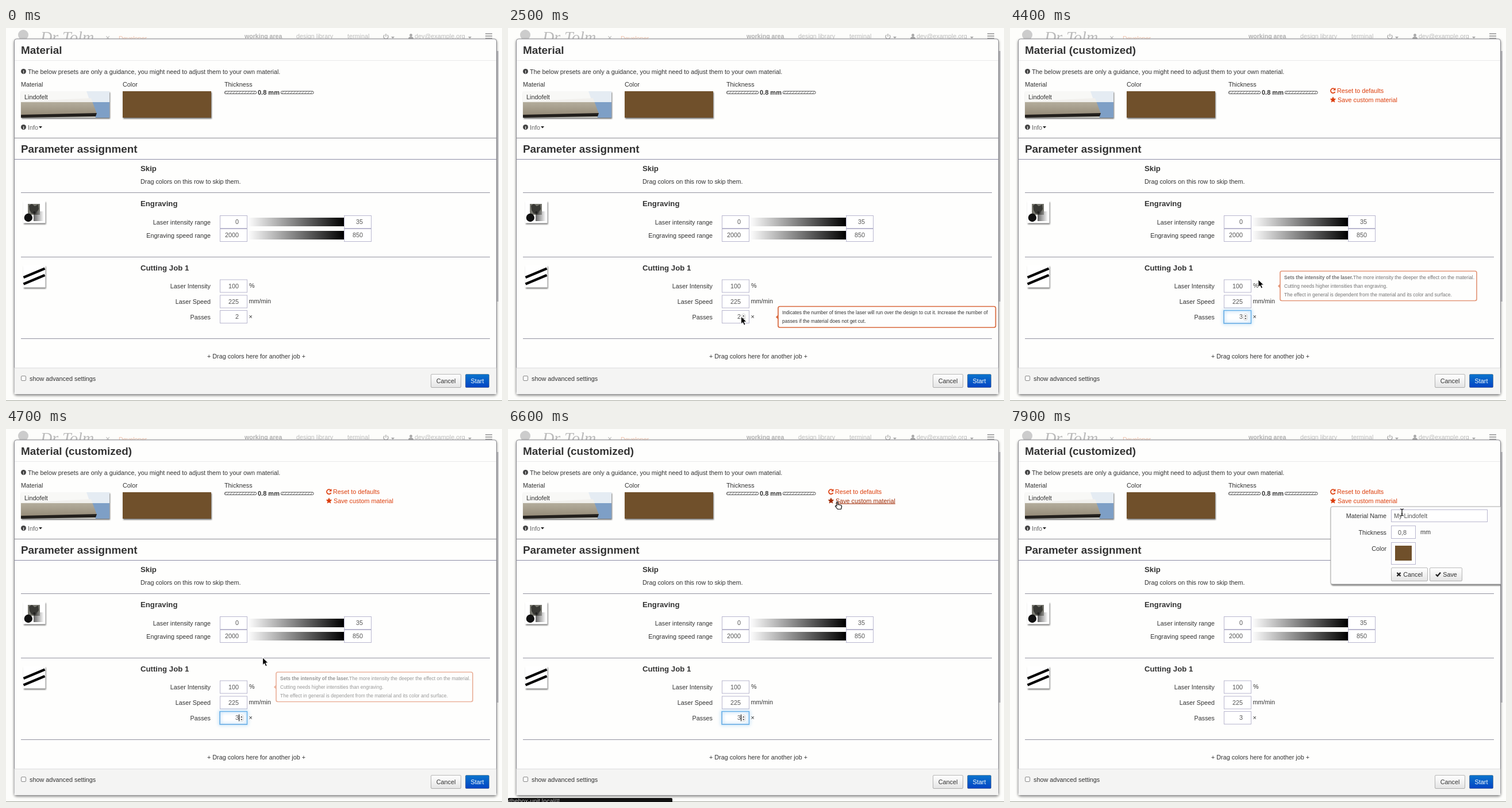
An HTML page that plays this animation: 863x649 px, repeating every 8000 ms.

```html
<!DOCTYPE html>
<html lang="en">
<head>
<meta charset="utf-8">
<title>Material settings</title>
<style>
html, body { margin: 0; width: 100%; height: 100%; overflow: hidden; background: #fdfdfb; }
svg { display: block; font: 10.8px "Liberation Sans", Arial, sans-serif; }
text { white-space: pre; }
.card { filter: drop-shadow(1px 2px 1px #0008); }
.link { fill: #dc3e0c; }
</style>
</head>
<body>
<svg id="stage" width="863" height="649" viewBox="0 0 863 649">
  <defs>
    <linearGradient id="ramp"><stop stop-color="#fff"/><stop offset="1"/></linearGradient>
    <linearGradient id="grey" x2="0" y2="1"><stop stop-color="#fff"/><stop offset="1" stop-color="#e4e4e4"/></linearGradient>
    <linearGradient id="blue" x2="0" y2="1"><stop stop-color="#0a74cc"/><stop offset="1" stop-color="#0444c4"/></linearGradient>
    <linearGradient id="slab" x2="0" y2="1"><stop stop-color="#bdb8a8"/><stop offset="1" stop-color="#958b78"/></linearGradient>
    <pattern id="hatch" width="5" height="6" patternUnits="userSpaceOnUse"><path d="M0 6L5 0" stroke="#777"/></pattern>
    <clipPath id="modalClip"><rect x="14" y="19" width="839.5" height="618"/></clipPath>
  </defs>
</svg>
<script>
const INK = '#333', BROWN = '#70502b', FIELD = '#b9b7cf';
const stage = document.getElementById('stage');

const text = (x, y, s, attrs = '') => `<text x="${x}" y="${y}" fill="${INK}" ${attrs}>${s}</text>`;
const bold = (x, y, s, size, attrs = '') => text(x, y, s, `font-weight="bold" font-size="${size}" ${attrs}`);
const label = (y, s, x = 356) => text(x, y, s, 'text-anchor="end"');
const rect = (x, y, w, h, fill, attrs = '') =>
  `<rect x="${x}" y="${y}" width="${w}" height="${h}" fill="${fill}" ${attrs}/>`;
const path = (d, attrs) => `<path d="${d}" ${attrs}/>`;
const line = (y, x1, x2, color) => path(`M${x1} ${y}H${x2}`, `stroke="${color}"`);
const group = (id, body, attrs = '') => `<g id="${id}" ${attrs}>${body}</g>`;
const box = (x, y, w, h) => rect(x + .5, y + .5, w - 1, h - 1, '#fff', `stroke="${FIELD}"`);
const field = (x, y, value, id = '') =>
  box(x, y, 48, 23) + text(x + 33, y + 15.3, value, `text-anchor="end" id="${id}" style="fill:#555"`);
const button = (x, y, w, s, fill = 'url(#grey)', color = INK, dx = 0) =>
  rect(x + .5, y + .5, w - 1, 23, fill, 'rx="1.5" stroke="#0004"') +
  text(x + w / 2 + dx, y + 16, s, `text-anchor="middle" style="fill:${color}"`);
const badge = (y, s) => `<circle cx="30.5" cy="${y}" r="4.5" fill="#444"/>` +
  bold(30.5, y + 3, s, 8, 'text-anchor="middle" style="fill:#fff"');
const caretDown = (x, y, color) => path(`M${x} ${y}h6l-3 3.5z`, `fill="${color}"`);

function tooltip(id, y, w, h, tip, lines) {
  const rows = lines.map((s, i) => text(477, y + 13.5 + i * 15, s, 'font-size="8.5"')).join('');
  return group(id, rect(470, y, w, h, '#fefefe', 'rx="3" stroke="#d8683c" stroke-width="1.7"') +
    path(`M470 ${tip - 4}l-4 4 4 4z`, 'fill="#d8683c"') + rows);
}

const header =
  '<circle cx="30" cy="12" r="9" fill="#ccc"/>' +
  text(60, 25, 'Dr Tolm', 'style="font:italic 28px \'Liberation Serif\',serif;fill:#bbb"') +
  text(173, 22, '×', 'style="fill:#bbb" font-size="14"') +
  text(196, 22, 'Developer', 'style="fill:#f0c4ae"') +
  bold(415, 18, 'working area', 10.6, 'style="fill:#b2b2b2"') +
  ['505|design library', '594|terminal', '711|dev@example.org'].map(s => {
    const [x, word] = s.split('|');
    return text(x, 18, word, 'style="fill:#bdbdbd"');
  }).join('') +
  path('M658.5 12a4 4 0 1 0 5 0M661 10v5', 'fill="none" stroke="#aaa" stroke-width="1.4"') +
  path('M700 19q0-4 4.5-4t4.5 4zM704.5 10a2.5 2.5 0 1 0 .1 0', 'fill="#aaa"') +
  caretDown(670, 15, '#aaa') + caretDown(804, 15, '#aaa') +
  path('M834 10h12M834 14h12M834 18h12', 'stroke="#aaa" stroke-width="2"');

const photo = group('', rect(26, 110, 154, 46, '#dcdcd4') +
  path('M140 110h40v46h-24z', 'fill="#7e9fc6"') +
  path('M26 128l122-6 10 27-132 3z', 'fill="url(#slab)"') +
  path('M26 151l132-3-2 6-130 2z', 'fill="#221f1c"') +
  rect(26, 110, 154, 19, '#fffc'), 'class="card"') + text(32, 124, 'Lindofelt');

const bar = (x, w) => rect(x, 110, w, 4.5, '#fff', 'rx="1.5"') +
  rect(x, 110, w, 4.5, 'url(#hatch)', 'rx="1.5" stroke="#555"');

const material =
  bold(26, 44.5, 'Material', 18.9, 'id="title"') + line(56.5, 15, 853, '#eaeaea') +
  badge(75.5, '!') + text(38, 79.5, 'The below presets are only a guidance, you might need to adjust them to your own material.') +
  text(26, 102.3, 'Material') + text(203, 102.3, 'Color') + text(380, 102.3, 'Thickness') +
  photo + rect(203, 110, 154, 46, BROWN, 'class="card"') +
  bar(380.5, 55) + bar(478.5, 56.5) + bold(438, 116.3, '0.8 mm', 11) +
  badge(172.5, 'i') + text(38, 176.5, 'Info', 'style="fill:#666"') + caretDown(57, 171, '#222') +
  line(191.5, 15, 853, '#8c8c94') + bold(26, 217, 'Parameter assignment', 18.9) + line(228.5, 15, 853, '#8c8ca4');

const links = group('links',
  path('M565 106.5a4 4 0 1 0 .6 4.5', 'fill="none" stroke="#dc3e0c" stroke-width="1.7"') +
  path('M566.5 104v4.5h-4.5z', 'fill="#dc3e0c"') +
  text(569, 113.3, 'Reset to defaults', 'style="fill:#dc3e0c"') +
  group('save', path('M562 119.3l1.6 3.5 3.7.4-2.8 2.6.8 3.8-3.3-1.9-3.3 1.9.8-3.8-2.8-2.6 3.7-.4z', '') +
    '<text x="570" y="128.5">Save custom material</text>', 'class="link"'));

const iconBox = y => rect(30, y, 38.5, 38.5, '#fff', 'class="card"');
const jobs =
  bold(234, 249, 'Skip', 13.2) + text(234, 271.3, 'Drag colors on this row to skip them.') +
  line(286.5, 26, 842, '#9292a0') +
  iconBox(301) + rect(38, 306, 21, 19, '#77776f') + path('M40 309l5-3 5 4 6-3 1 8-5 8h-7l-4-6z', 'fill="#383834"') +
  rect(48, 319, 18, 17, 'url(#ramp)', 'transform="rotate(180 57 327.5)" opacity=".6"') + '<circle cx="38.8" cy="330" r="7.2" fill="#111"/>' +
  bold(234, 309.5, 'Engraving', 13.2) +
  label(341.5, 'Laser intensity range') + label(364.5, 'Engraving speed range') +
  rect(420, 330, 168, 15, 'url(#ramp)') + rect(420, 353, 168, 15, 'url(#ramp)') +
  field(372, 326, '0') + field(588, 326, '35') + field(372, 349, '2000') + field(588, 349, '850') +
  line(398.5, 26, 842, '#9292a0') +
  iconBox(413) + path('M30.5 434L67.5 418.5M30.5 445.5L67.5 430', 'stroke="#000" stroke-width="4.5"') +
  bold(234, 421.7, 'Cutting Job 1', 13.2) +
  label(453, 'Laser Intensity') + label(479.7, 'Laser Speed') + label(506.5, 'Passes') +
  field(372, 437.5, '100') + field(372, 464.5, '225') + field(372, 491, '2', 'passes') +
  group('focus', rect(372, 491.5, 47.5, 22.5, 'none', 'stroke="#62aee8" stroke-width="1.4" style="filter:drop-shadow(0 0 3px #52a8ec)"')) +
  group('spinner', rect(406.5, 497.5, 6.5, 11, '#fff', 'rx="3" stroke="#bbb" stroke-width=".7"') +
    path('M408 502l1.8-2.5 1.8 2.5zM408 504.5l1.8 2.5 1.8-2.5z', 'fill="#444"')) +
  group('caret', path('M405.5 496.5v12', 'stroke="#111"')) +
  text(423, 452, '%') + text(422.5, 479, 'mm/min') + text(422.5, 506, '×') +
  line(540.5, 26, 842, '#9292a0') +
  text(435.5, 575.3, '+ Drag colors here for another job +', 'text-anchor="middle"');

const footer = rect(14.5, 591, 839, 46, '#f4f4f3') + line(591.5, 15, 853, '#dedede') +
  rect(26.5, 605.5, 8, 8, '#fff', 'rx="1.5" stroke="#888"') + text(41, 614, 'show advanced settings') +
  button(739, 602, 53, 'Cancel') + button(799, 602, 42, 'Start', 'url(#blue)', '#fff');

const popover = group('popover',
  rect(558, 135, 310, 135, '#fdfdfd', 'rx="3" stroke="#aaa" class="card"') +
  label(155.3, 'Material Name', 655) + label(183.5, 'Thickness', 655) + label(212, 'Color', 655) +
  box(663, 140, 168, 22) + text(668, 155.3, 'My Lindofelt', 'style="fill:#555"') +
  box(663, 168, 43, 23) + text(675, 183.7, '0,8', 'style="fill:#555"') + text(714, 183, 'mm') +
  box(663, 197, 43, 39) + rect(670, 203, 29, 26, BROWN) +
  button(663, 241, 64, 'Cancel', undefined, INK, 6) + path('M673.5 250l6 6m0-6l-6 6', 'stroke="#222" stroke-width="2.4"') +
  button(730, 241, 57, 'Save', undefined, INK, 7) + path('M741 253l2.8 2.8 5.2-6', 'fill="none" stroke="#222" stroke-width="2.4"'));

const cursors =
  group('arrow', path('M0 0v13l3-2.8 2.2 5 2.4-1-2.2-5h4.2z', 'stroke="#fff" stroke-width="1"')) +
  group('beam', path('M-3-6q3 0 3 2.5q0-2.5 3-2.5M0-4v8M-3 6q3 0 3-2.5q0 2.5 3 2.5M-1.5 2h3', 'fill="none" stroke="#111" stroke-width="1.2"')) +
  group('hand', path('M-1 0q1.5-1 2 .5v4l5 1q2 .5 1.5 3l-1 4h-6l-4-5q0-2 2.5-.5z', 'fill="#fff" stroke="#111" stroke-width="1.2"'));

stage.innerHTML += header +
  rect(854, 40, 3, 436, '#c9c9cc') + line(648.5, 0, 863, '#a3a69c') +
  rect(14.5, 19, 839, 618, '#fefefd', 'rx="4" stroke="#8a8a90" style="filter:drop-shadow(0 2px 2px #0007)"') +
  group('modal', material + jobs + footer + links + popover, 'clip-path="url(#modalClip)"') +
  tooltip('passesTip', 484.5, 378.5, 36.5, 503, [
    'Indicates the number of times the laser will run over the design to cut it. Increase the number of',
    'passes if the material does not get cut.']) +
  tooltip('powerTip', 423, 342, 51.5, 449, [
    '<tspan font-weight="bold">Sets the intensity of the laser.</tspan>The more intensity the deeper the effect on the material.',
    'Cutting needs higher intensities than engraving.',
    'The effect in general is dependent from the material and its color and surface.']) +
  group('status', rect(0, 642, 286, 10, '#111', 'rx="2"') + text(-6, 651, 'lathebox-unit.local/#', 'style="fill:#aaa"')) +
  cursors;

const el = id => document.getElementById(id);
const show = (id, on) => el(id).style.display = on ? '' : 'none';
const clamp = v => Math.max(0, Math.min(1, v));
const fade = (t, start, end, ms = 150) => Math.min(clamp((t - start) / ms), clamp((end - t) / ms));

// Pointer stops: time, x, y
const route = [
  [500, 424, 655], [1200, 401, 506], [2300, 401, 506], [2700, 410, 498], [3950, 410, 498],
  [4700, 446.5, 398], [5200, 512.5, 276], [6400, 573, 127], [7150, 573, 127], [7700, 682, 145], [8000, 682, 145]
];
function pointer(t) {
  const i = Math.max(1, route.findIndex(p => p[0] > t));
  const [t0, x0, y0] = route[i - 1], [t1, x1, y1] = route[i];
  const k = clamp((t - t0) / (t1 - t0));
  return [x0 + (x1 - x0) * k, y0 + (y1 - y0) * k];
}

function draw(t) {
  const [x, y] = pointer(t);
  const custom = t >= 3700, focused = t >= 3400 && t < 7000;
  const overLink = t >= 6400 && t < 7300;
  const overInput = x < 421 && y > 491 && y < 514;
  const kind = overLink ? 'hand' : overInput && x < 405 || t >= 7550 ? 'beam' : 'arrow';

  for (const id of ['arrow', 'beam', 'hand']) {
    show(id, id === kind && t >= 500);
    el(id).setAttribute('transform', `translate(${x} ${y})`);
  }
  el('title').textContent = custom ? 'Material (customized)' : 'Material';
  el('passes').textContent = t >= 3400 ? '3' : '2';
  show('links', custom);
  show('focus', focused);
  show('spinner', focused || overInput);
  show('caret', focused && (t < 3500 || t % 1000 >= 500));
  show('status', overLink);
  el('save').style.fill = overLink ? '#a02a04' : '';
  el('save').style.textDecoration = overLink ? 'underline' : '';
  el('passesTip').style.opacity = fade(t, 1200, 4250);
  el('powerTip').style.opacity = fade(t, 4300, 4775);
  el('popover').style.opacity = clamp((t - 7000) / 100);
}

const begin = performance.now();
function tick() {
  draw((performance.now() - begin) % 8000);
  requestAnimationFrame(tick);
}
tick();
</script>
</body>
</html>
```
